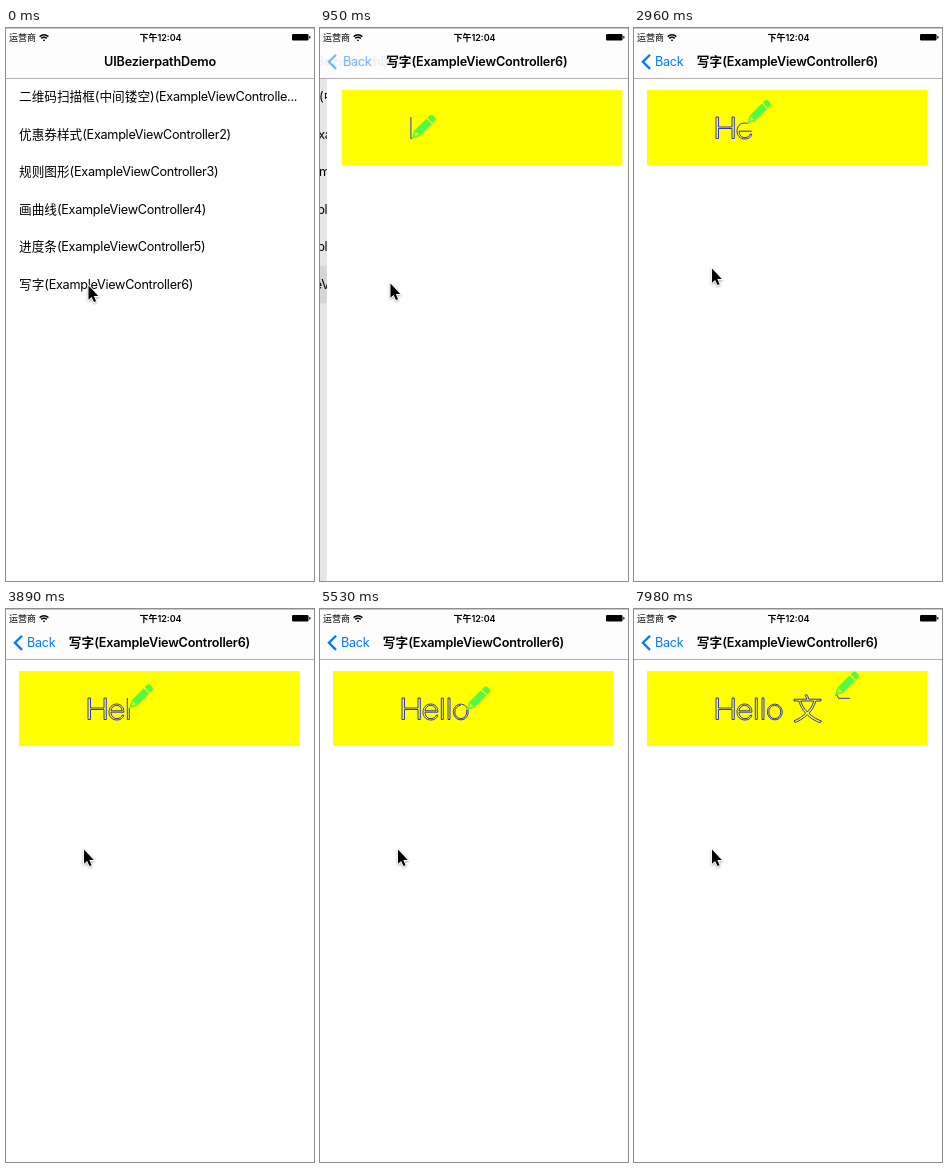
Animation, 308 px wide and 553 px high, one loop 8000 ms. Source, as an HTML page:

```html
<!DOCTYPE html>
<html lang="zh-CN">
<head>
<meta charset="utf-8">
<title>UIBezierpathDemo</title>
<style>
  html, body { margin: 0; width: 100%; height: 100%; overflow: hidden; background: #fff; }
  svg { display: block; width: 308px; height: 553px; }
  text { font: 12.65px Inter, "Noto Sans CJK SC", "Noto Sans CJK", sans-serif; }
  .latin { letter-spacing: -.27px; }
  .title { font-weight: 600; text-anchor: middle; }
  .title.latin, .title .latin { letter-spacing: -.17px; }
  .status { font-size: 9px; }
  #ink path { fill: none; stroke: #00f; stroke-width: .8; }
  #cursor { filter: drop-shadow(0 1px 1px #0005); }
</style>
</head>
<body>
<svg viewBox="0 0 308 553">
  <rect width="308" height="553" fill="#fff"/>
  <g id="list">
    <rect id="selected" y="237.7" width="308" height="37.5" fill="#ececec"/>
  </g>
  <rect id="dim" width="308" height="553"/>

  <g id="page">
    <rect x="-2" width="310" height="553" fill="#fff"/>
    <rect x="13" y="62" width="280.5" height="75" fill="#ff0"/>
    <g id="ink"></g>
    <g id="pencil" fill="#50fb48">
      <g transform="rotate(-45)">
        <path fill-rule="evenodd" d="M0 0L7 -3.8H24.2V3.8H7ZM3.6 0L7.6 2.3V-2.3Z"/>
        <path d="M25.6 -3.8H28.6Q31 -3.8 31 -1.4V1.4Q31 3.8 28.6 3.8H25.6Z"/>
      </g>
    </g>
  </g>

  <rect width="308" height="50" fill="#fdfdfd"/>
  <rect width="308" height="1" fill="#c8c8c8"/>
  <rect y="50" width="308" height="1" fill="#b2b2b2"/>
  <text class="status" x="3" y="13">运营商</text>
  <g fill="none" stroke="#000" stroke-width="1.4">
    <path d="M33.6 8.6Q38 4.8 42.4 8.6M35.2 10.4Q38 8 40.8 10.4"/>
    <path d="M37 12.2L38 13 39 12.2Q38 11.4 37 12.2Z" fill="#000" stroke-width=".5"/>
  </g>
  <text class="status title" x="154.5" y="13">下午12:04</text>
  <rect x="286" y="6" width="16.5" height="6.4" rx="1.2"/>
  <rect x="303.2" y="8" width="1.2" height="2.6" rx=".6"/>

  <text id="oldTitle" class="title latin" x="154" y="38">UIBezierpathDemo</text>
  <text id="newTitle" class="title" x="153.5" y="38">写字<tspan class="latin">(ExampleViewController6)</tspan></text>
  <g id="back">
    <path d="M16 26.7L8.9 33.8 16 40.9" fill="none" stroke="#007aff" stroke-width="2.3"/>
    <text id="backLabel" class="latin" x="21" y="38" fill="#007aff">Back</text>
  </g>

  <path id="cursor" d="M0 0V14.2L3.1 11.4 5.5 16.6 7.6 15.7 5.3 10.6H9.8Z" stroke="#fff" stroke-width="1.6" paint-order="stroke"/>
</svg>
<script>
const LOOP = 8000, TICK = 117.45, PUSH = 650;
const SVG = "http://www.w3.org/2000/svg";
const $ = id => document.getElementById(id);
const clamp = v => Math.min(1, Math.max(0, v));
const mix = (a, b, k) => a + (b - a) * k;
const move = (id, x, y = 0) => $(id).setAttribute("transform", `translate(${x} ${y})`);
const fade = (id, v) => $(id).setAttribute("opacity", v);

function add(parent, tag, attrs) {
  const el = document.createElementNS(SVG, tag);
  for (const key in attrs) el.setAttribute(key, attrs[key]);
  return parent.appendChild(el);
}

[
  ["二维码扫描框(中间镂空)", "(ExampleViewControlle..."],
  ["优惠券样式", "(ExampleViewController2)"],
  ["规则图形", "(ExampleViewController3)"],
  ["画曲线", "(ExampleViewController4)"],
  ["进度条", "(ExampleViewController5)"],
  ["写字", "(ExampleViewController6)"]
].forEach(([name, controller], i) => {
  const row = add($("list"), "text", { x: 13, y: 73 + i * 37.5 });
  row.textContent = name;
  add(row, "tspan", { class: "latin" }).textContent = controller;
});

// Outlines in writing order: start time and path; each ends as the next begins
const outlines = [
  [673, "M82 89V110.5H84.5V100.5H98V110.5H100.3V89H98V99H84.5V89Z"],
  [2122, "M117.9 103.2H105C105.2 107.5 107.8 109.6 111 109.6C113.8 109.6 115.5 108 116 106.2H117.8C117 109.3 114.6 111 111 111C106 111 103 107.6 103 103.2C103 98.6 106 95 110.6 95C115.5 95 118 98.6 117.9 103.2Z"],
  [3060, "M105 101.8H116.1C115.8 98.5 113.8 96.4 110.6 96.4C107.4 96.4 105.4 98.7 105 101.8Z"],
  [3480, "M121.3 89V110.5H123.3V89Z"],
  [4020, "M128 89V110.5H130V89Z"],
  [4560, "M136 96.8A7.6 8 0 0 0 145.6 109.2A7.6 8 0 0 0 136 96.8"],
  [5150, "M140.8 96.4A6 6.6 0 0 0 140.8 109.6A6 6.6 0 0 0 140.8 96.4"],
  [5620, "M160 92H164.8C166.3 97 168.5 101 171.6 104.2C168.5 107.5 164.5 110 160 111.8L161 113.6C165.8 111.6 170 109 173.2 105.8C176.5 109.2 181 112 186 113.8L187.5 112C182.5 110.3 178.3 107.6 175 104.3C178.2 101 180.5 97 181.8 92H187V90.2H174.8C174.4 88.5 173.7 87 172.8 85.5L171 86.2C171.8 87.5 172.4 88.8 172.8 90.2H160Z"],
  [7220, "M166.7 92H179.8C178.5 96.5 176.4 100 173.4 103C170.3 100 168.2 96.5 166.7 92Z"],
  [7765, "M216 89.3H204.5C204 88 203.4 86.8 202.7 85.5L201.2 86.2"]
];
const strokes = outlines.map(([start, d], i) => {
  const end = i + 1 < outlines.length ? outlines[i + 1][0] : 7980;
  const path = add($("ink"), "path", { d });
  return { start, end, path, length: path.getTotalLength() };
});

function write(t) {
  let tip = strokes[0].path.getPointAtLength(0);
  for (const { start, end, path, length } of strokes) {
    const drawn = length * clamp((t - start) / (end - start));
    path.style.display = drawn > 0 ? "" : "none";
    path.setAttribute("stroke-dasharray", drawn < length ? `${drawn} ${length + 9}` : "none");
    if (t >= start) tip = path.getPointAtLength(drawn);
  }
  move("pencil", tip.x, tip.y);
}

function push(t) {
  // Critically damped spring
  const w = Math.max(0, t - PUSH) * .01826;
  const rest = (1 + w) * Math.exp(-w);
  const shown = clamp((t - PUSH) / 500);
  move("page", 308 * rest);
  move("list", -92.4 * (1 - rest));
  fade("dim", .1 * (1 - rest));
  fade("selected", t > PUSH ? 1 : 0);
  move("oldTitle", -118 * (1 - rest));
  fade("oldTitle", clamp(1 - shown * 1.6));
  move("newTitle", 114 * rest);
  fade("newTitle", clamp(shown * 1.7));
  fade("back", shown * shown * .3 + shown * .7);
  move("backLabel", 70 * rest);
}

function point(t) {
  const aim = clamp(t / 360);
  const k = clamp((t - 950) / 470), leave = k * k * (3 - 2 * k);
  move("cursor", mix(mix(82.5, 70.5, aim), 78, leave), mix(mix(257.5, 255.5, aim), 240.5, leave));
}

let began;
function frame(now) {
  began ??= now;
  const step = Math.floor(((now - began) % LOOP + 8) / TICK);
  const t = step ? step * TICK + 6 : 0;
  push(t);
  write(t);
  point(t);
  requestAnimationFrame(frame);
}
requestAnimationFrame(frame);
</script>
</body>
</html>
```
